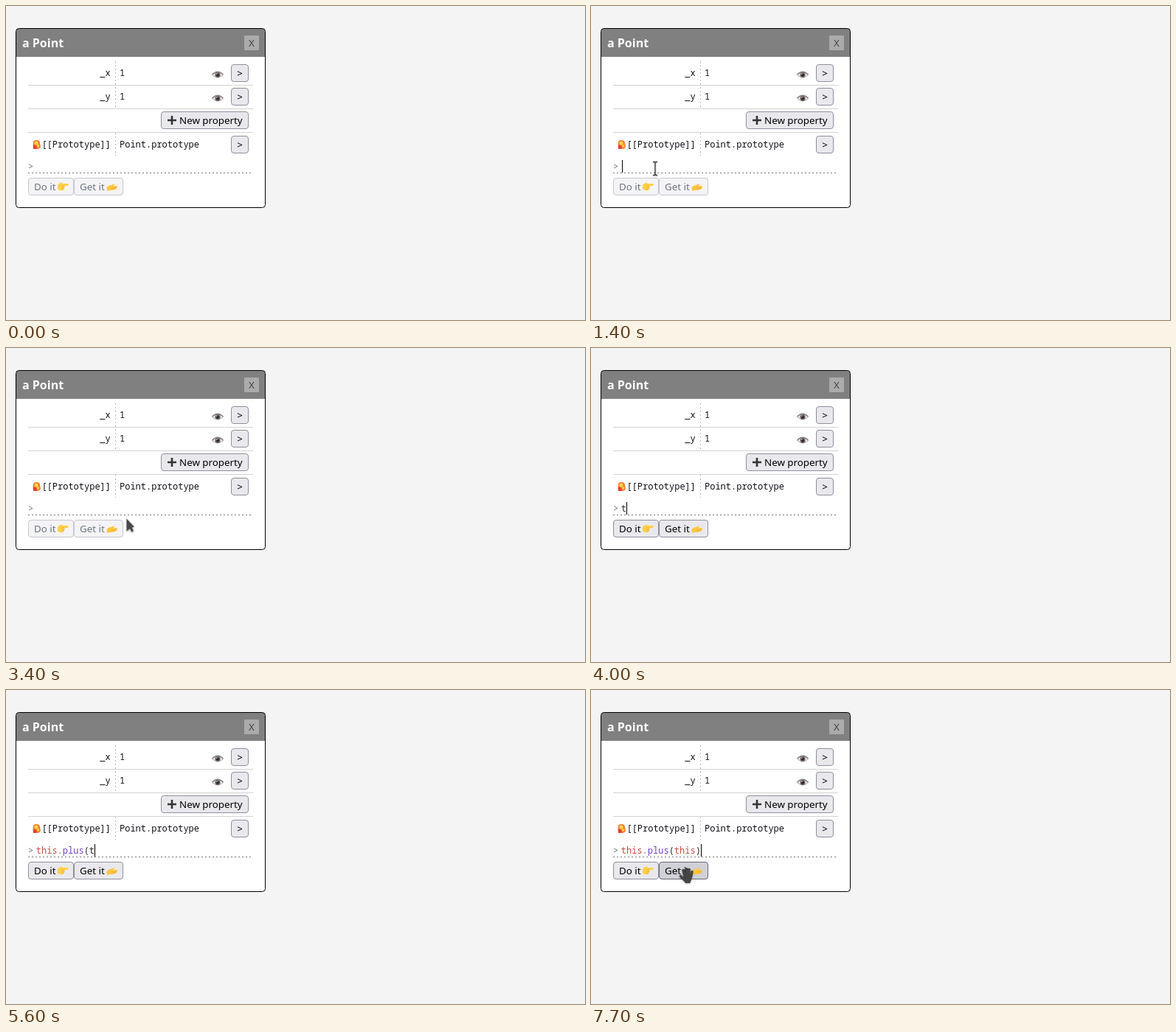
Recreate the animation shown at these times as an HTML page. Size 785x426 px, loop 8 s.

```html
<!DOCTYPE html>
<html lang="en">
<head>
<meta charset="utf-8">
<title>Object inspector</title>
<style>
  html, body { margin: 0; height: 100%; overflow: hidden; background: #f4f4f4; }
  svg { display: block; width: 785px; height: 426px; }
  text { font: 13.333px "Noto Sans", sans-serif; fill: #000; white-space: pre; }
  .title { font-weight: bold; font-size: 16px; fill: #fff; }
  .mono { font: 12px "Noto Sans Mono", monospace; fill: #101018; }
  .mid { text-anchor: middle; }
  .btn rect { fill: #e9e9ed; stroke: #8f8f9d; }
  .btn.off rect { fill: #f4f4f6; stroke: #c7c7ce; }
  .btn.off text { fill: #6d7580; }
  .btn.hover rect { fill: #d0d0d7; stroke: #676774; }
  .rule { stroke: #d3d3d3; }
  .dots { stroke: #b8b8b8; stroke-dasharray: 2 3; }
  #cursor { filter: drop-shadow(0 1px 1px rgba(0, 0, 0, .3)); }
  #cursor > * { display: none; }
</style>
</head>
<body>
<svg viewBox="0 0 785 426">
  <defs>
    <g id="eye">
      <path d="M-7.5 .5Q0-6.5 7.5 .5Q0 7 -7.5 .5Z" fill="#eee" stroke="#aaa"/>
      <path d="M-7.5 0Q0-7.5 7.5 0" fill="none" stroke="#858585" stroke-width="1.2"/>
      <circle cy=".6" r="3.6" fill="#70635e"/>
      <circle cy=".6" r="1.9" fill="#222"/>
      <circle cx="-1.2" cy="-.8" r=".8" fill="#ddd"/>
    </g>
    <g id="open" class="btn">
      <rect x=".5" y=".5" width="23" height="23" rx="3.5"/>
      <text class="mid" x="12" y="17">&gt;</text>
    </g>
  </defs>

  <rect x="13.5" y="30.5" width="338" height="243" rx="4" fill="#fff"/>
  <path d="M14 69V34a3.5 3.5 0 0 1 3.5-3.5h330a3.5 3.5 0 0 1 3.5 3.5v35z" fill="#808080"/>
  <rect x="13.5" y="30.5" width="338" height="243" rx="4" fill="none" stroke="#000"/>
  <text class="title" x="22" y="56">a Point</text>
  <rect x="323" y="40" width="20" height="20" rx="1" fill="#ababab"/>
  <text class="mid" x="333" y="55" style="fill:#444">X</text>

  <path class="rule" d="M30 107.5H335M30 139.5H335M30 171.5H335"/>
  <path class="dots" d="M148.5 75V139M148.5 172V203"/>
  <path class="dots" d="M30 226.5H335" style="stroke:#777"/>

  <text class="mono" x="127.2" y="95">_x</text>
  <text class="mono" x="154" y="95">1</text>
  <text class="mono" x="127.2" y="127">_y</text>
  <text class="mono" x="154" y="127">1</text>
  <text class="mono" x="48.4" y="192">[[Prototype]]</text>
  <text class="mono" x="154" y="192">Point.prototype</text>
  <use href="#eye" x="287" y="93"/>
  <use href="#eye" x="287" y="125"/>
  <use href="#open" x="305" y="79"/>
  <use href="#open" x="305" y="111"/>
  <use href="#open" x="305" y="176"/>

  <g transform="translate(36 182)">
    <path d="M1 3Q1 0 5 0Q10 0 10 4L11 9Q10 12 6 12H1Q0 8 1 3Z" fill="#f9792f"/>
    <circle cx="5" cy="4" r="2.6" fill="#ffd54a"/>
    <path d="M1 7Q4 6 6 9L5 12H1Z" fill="#e8403a"/>
    <circle cx="7.5" cy="8" r="1.9" fill="#ffca3e"/>
  </g>

  <g class="btn">
    <rect x="210.5" y="143.5" width="118" height="23" rx="3.5"/>
    <path d="M219 155H231M225 149V161" stroke="#333" stroke-width="2.6"/>
    <text x="235" y="160">New property</text>
  </g>

  <g class="btn" id="doIt">
    <rect x="30.5" y="233.5" width="61" height="23" rx="3.5"/>
    <text x="38" y="250">Do it</text>
    <path d="M70 243Q72 240 75 239.500L77 241H84Q85.500 242.500 84 244H79.500Q80.500 245.500 79 246.500Q79.500 248.500 78 249Q77 250.500 75 250.300Q71 250 70 248Z" fill="#fdd04a"/>
    <path d="M75 244H79.500M75.500 246.500H79M75.500 248.700H78" stroke="#eda52c" stroke-width=".7"/>
  </g>
  <g class="btn" id="getIt">
    <rect x="92.5" y="233.5" width="66" height="23" rx="3.5"/>
    <text x="100" y="250">Get it</text>
    <path d="M136.500 246Q139 243 142 243L146 241.500Q148 241.300 147 243L144.500 244.500L150 244Q152 245 150 246.300Q151.500 247.500 149 248.300Q145 250.500 141 250L137 251Z" fill="#fdc740"/>
    <path d="M143 246.500L150 246M143 248.500L149 248" stroke="#eda52c" stroke-width=".7"/>
  </g>

  <text class="mono" x="30" y="222" style="fill:#777">&gt;</text>
  <text class="mono" id="code" x="40.8" y="222"></text>
  <rect id="caret" y="209" width="1" height="17"/>

  <g id="cursor">
    <path id="arrow" d="M.5 .5L10.800 11.500L7.800 12.500L10 17L7.500 18.700L5 14.200L.5 17.500Z" fill="#484848" stroke="#999" stroke-width=".4"/>
    <path id="beam" d="M-3-8.500H-1.500Q0-8.500 0-7V8Q0 9.500 -1.500 9.500H-3M3-8.500H1.500Q0-8.500 0-7M0 8Q0 9.500 1.500 9.500H3" fill="none" stroke="#333" stroke-width="1.3"/>
    <g id="hand" fill="none" stroke="#444" stroke-width="3.3" stroke-linecap="round">
      <path d="M-4-1.500L-2 7M0-3.500L.8 7M4.200-2.500L3.800 7M8 .5L6.500 8M-7.500 6.500L-3 11"/>
      <path d="M-2.500 6H7L6 11.500L4.500 15H-.5L-3.500 11Z" fill="#444" stroke-width="2" stroke-linejoin="round"/>
    </g>
  </g>
</svg>
<script>
const LOOP = 8000, STEP = 100;
const $ = id => document.getElementById(id);
const DARK = '#2a2d33', RED = '#cb4b40', PURPLE = '#6f42c1';

// [text, colour, characters needed before the colour applies]
const tokens = [
  ['this', RED, 4], ['.', '#777', 5], ['plus', PURPLE, 10],
  ['(', DARK, 0], ['this', RED, 14], [')', DARK, 0]
];
// [time, characters typed]
const typing = [
  [4000, 1], [4100, 2], [4200, 3], [4300, 4], [4500, 5], [4800, 6], [4900, 7],
  [5000, 8], [5200, 9], [5400, 10], [5600, 11], [5700, 13], [5800, 14], [6100, 15]
];
const caretOn = [[1400, 2500], [3600, 6300], [7500, LOOP]];
// Pointer trips: [time, x, y]; the pointer hides after `until`
const trips = [
  { until: 4000, keys: [[500, 118, 36], [700, 110, 84], [900, 99, 150], [1100, 90, 205], [1300, 87, 220],
    [3100, 87, 220], [3200, 105, 222], [3300, 135, 226], [3400, 163, 231], [3500, 178, 237], [3800, 193, 246]] },
  { until: LOOP, keys: [[7400, 178, 248], [7500, 156, 247], [7700, 129, 246]] }
];

const spans = tokens.map(() => $('code').appendChild(
  document.createElementNS('http://www.w3.org/2000/svg', 'tspan')));

function pointer(t) {
  const trip = trips.find(p => t >= p.keys[0][0] && t < p.until);
  if (!trip) return null;
  const i = trip.keys.findIndex(k => k[0] > t);
  if (i < 0) return trip.keys[trip.keys.length - 1].slice(1);
  const a = trip.keys[i - 1], b = trip.keys[i], f = (t - a[0]) / (b[0] - a[0]);
  return [1, 2].map(j => Math.round(a[j] + (b[j] - a[j]) * f));
}

function drawCode(t) {
  const count = typing.reduce((n, [at, typed]) => t >= at ? typed : n, 0);
  let start = 0;
  tokens.forEach(([text, colour, need], i) => {
    spans[i].textContent = text.slice(0, Math.max(0, count - start));
    spans[i].style.fill = count >= need ? colour : DARK;
    start += text.length;
  });
  $('caret').setAttribute('x', count ? Math.round(40.8 + 7.2 * count) : 42);
  $('caret').style.display = caretOn.some(([a, b]) => t >= a && t < b) ? '' : 'none';
  for (const id of ['doIt', 'getIt']) $(id).classList.toggle('off', !count);
}

function drawPointer(t) {
  const pos = pointer(t);
  let shape = '';
  if (pos) {
    const [x, y] = pos;
    shape = y > 208 && y < 228 ? 'beam' : x > 92 && x < 159 && y > 233 ? 'hand' : 'arrow';
    $('cursor').setAttribute('transform', `translate(${x} ${y})`);
  }
  for (const id of ['arrow', 'beam', 'hand']) $(id).style.display = id === shape ? 'inline' : 'none';
  $('getIt').classList.toggle('hover', shape === 'hand');
}

function tick() {
  const t = Math.floor(performance.now() % LOOP / STEP) * STEP;
  drawCode(t);
  drawPointer(t);
  requestAnimationFrame(tick);
}
tick();
</script>
</body>
</html>
```
